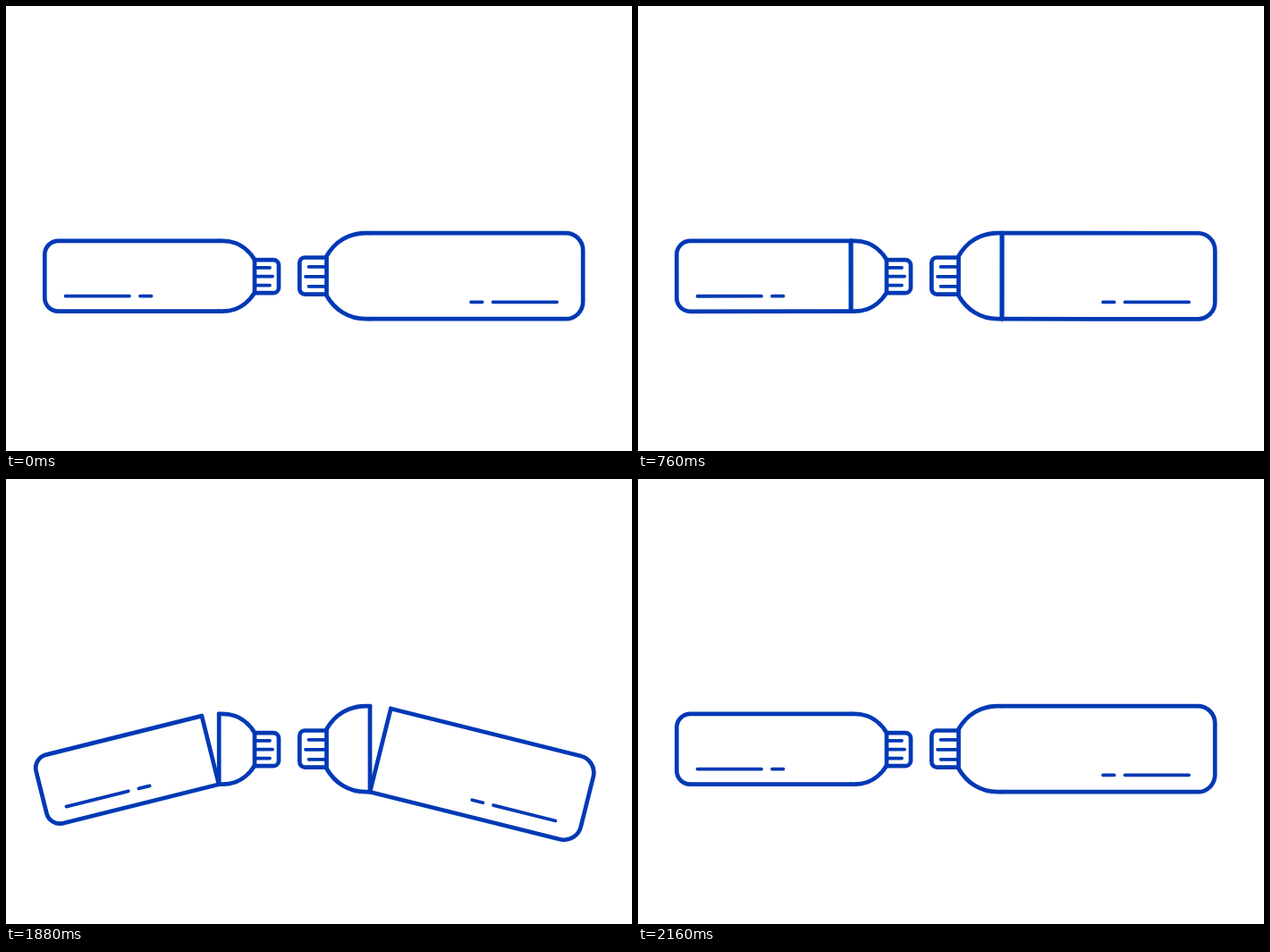
An HTML page for the animation above (2.8 s loop, 700 by 498 pixels).

```html
<!DOCTYPE html>
<html lang="en">
<head>
<meta charset="utf-8">
<title>Bottles</title>
<style>
  html, body { margin: 0; width: 100%; height: 100%; overflow: hidden; background: #fff; }
  svg { display: block; width: 100vw; height: 100vh; }
  path { fill: none; stroke: #0039b5; stroke-width: 4.7; stroke-linecap: round; stroke-linejoin: round; }
  .thin { stroke-width: 3.8; }
</style>
</head>
<body>
<svg viewBox="0 0 700 498">
  <g>
    <g id="leftBody">
      <path d="M238 262.8H58.5A15.2 15.2 0 0 0 43.3 278V326.5A15.2 15.2 0 0 0 58.5 341.7H238"/>
      <path class="edge" d="M238 262.8V341.7"/>
      <path class="thin" d="M66.5 324.6H138M150 324.6H162.5"/>
    </g>
    <path d="M238 262.8H242C257 262.8 270 270.5 278 284M278 320.8C270 334 257 341.7 242 341.7H238"/>
    <path d="M278 284.2H299A6 6 0 0 1 305 290.2V315.2A6 6 0 0 1 299 321.2H278Z"/>
    <path class="thin" d="M279 292.8H295M279 302.6H298M279 312.6H295"/>
    <path class="edge" d="M238.2 262.8V341.7"/>
    <path id="leftCut"/>
  </g>
  <g>
    <g id="rightBody">
      <path d="M407 254.1H626A19.2 19.2 0 0 1 645.2 273.3V331A19.2 19.2 0 0 1 626 350.2H407"/>
      <path class="edge" d="M407 254.1V350.2"/>
      <path class="thin" d="M520 331.3H532.5M544.5 331.3H616"/>
    </g>
    <path d="M407 254.1H402C383 254.1 367.5 264 358.5 280M358.5 324C367.5 340 383 350.2 402 350.2H407"/>
    <path d="M358.5 281.5H334.3A6 6 0 0 0 328.3 287.5V316.6A6 6 0 0 0 334.3 322.6H358.5Z"/>
    <path class="thin" d="M357 291.8H338.5M357 302.8H335M357 313.8H338.5"/>
    <path class="edge" d="M407 254.1V350.2"/>
    <path id="rightCut"/>
  </g>
</svg>
<script>
  const LOOP = 2800, STEP = 40;
  const CUT_TOP = 222.5, CUT_LENGTH = 151;
  const byId = id => document.getElementById(id);
  const edges = document.querySelectorAll('.edge');
  const clamp = v => Math.min(1, Math.max(0, v));

  // Opens with a cubic ease-in, closes at constant speed.
  function tilt(t) {
    if (t >= 2160) return 0;
    return 15 * (clamp((t - 720) / 280) ** 3 - clamp((t - 1860) / 305));
  }

  function drawCut(id, x, length) {
    byId(id).setAttribute('d', length > 0 ? `M${x} ${CUT_TOP}v${length}` : '');
  }

  function render(t) {
    const angle = tilt(t);
    byId('leftBody').setAttribute('transform', `rotate(${-angle} 238 341.7)`);
    byId('rightBody').setAttribute('transform', `rotate(${angle} 407 350.2)`);

    // The cutting line runs down through the bottles and back up.
    const length = CUT_LENGTH * clamp(1 - Math.abs(t - 300) / 300);
    drawCut('leftCut', 237.8, length);
    drawCut('rightCut', 406.6, length);

    const split = t >= 300 && t < 2160;
    edges.forEach(e => e.style.display = split ? '' : 'none');
  }

  function tick() {
    const t = performance.now() % LOOP;
    render(Math.floor(t / STEP) * STEP);
    requestAnimationFrame(tick);
  }
  tick();
</script>
</body>
</html>
```
